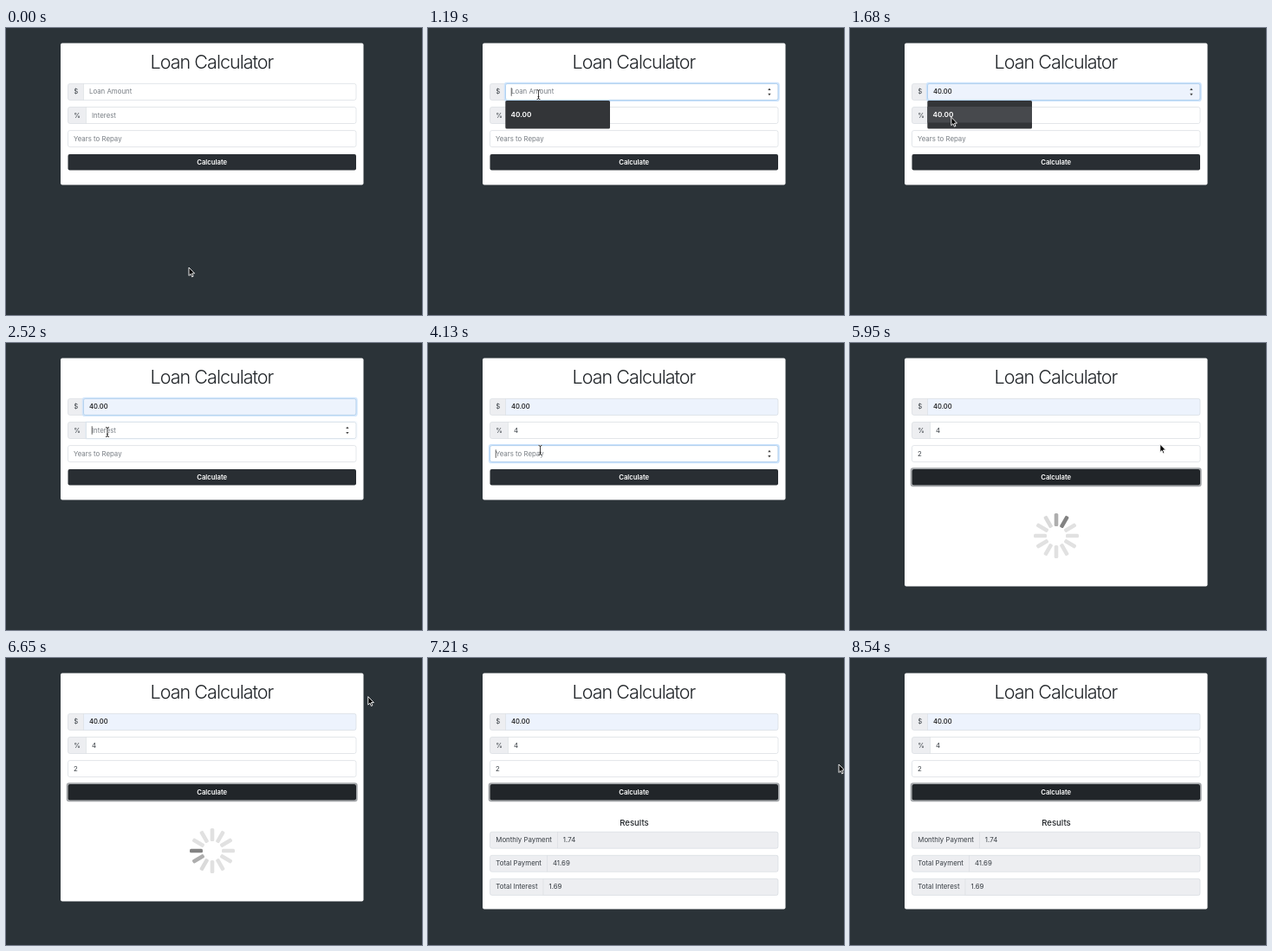
An HTML page that plays this animation: 480x332 px, repeating every 9.52 s.

```html
<!DOCTYPE html>
<html lang="en">
<head>
<meta charset="utf-8">
<title>Loan Calculator</title>
<style>
  html, body { margin: 0; width: 100%; height: 100%; overflow: hidden; background: #2b3338; }
  svg { display: block; width: 100vw; height: 100vh; }
  text { font: 400 7.85px Inter, "Liberation Sans", sans-serif; fill: #373d43; white-space: pre; }
  .title { font-size: 21.5px; font-weight: 300; letter-spacing: -.045em; fill: #212529; text-anchor: middle; }
  .head { font-size: 9.6px; font-weight: 500; fill: #212529; text-anchor: middle; }
  .hint { fill: #777d83; }
  .filled { font-size: 7.6px; font-weight: 500; fill: #111; }
  .button { font-size: 7.7px; font-weight: 600; fill: #fff; text-anchor: middle; }
  .option { font-size: 8.2px; font-weight: 600; fill: #fff; }
</style>
</head>
<body>
<svg id="stage" viewBox="0 0 480 332"></svg>
<script>
const LOOP = 9520, TICK = 70;
const GREY = '#edeef1', LINE = '#d3d8dd', DARK = '#292e33';
const LEFT = 71.5, RIGHT = 404, HIGH = 19, PITCH = 27.1, PAD = 6.5;
const OPEN = 1115, PICK = 2025, SUBMIT = 4955, DONE = 6930;
const stage = document.getElementById('stage');

function add(tag, attrs, parent = stage) {
  const el = document.createElementNS('http://www.w3.org/2000/svg', tag);
  for (const k in attrs) el.setAttribute(k, attrs[k]);
  parent.append(el);
  return el;
}
const group = parent => add('g', {}, parent);
const rect = (x, y, width, height, attrs, parent) =>
  add('rect', { x, y, width, height, ...attrs }, parent);
const outline = (x, y, w, h, stroke, width, parent) =>
  rect(x, y, w, h, { rx: 2.3, fill: 'none', stroke, 'stroke-width': width }, parent);
const shape = (d, attrs, parent) => add('path', { d, ...attrs }, parent);
function label(text, x, y, cls = '', parent) {
  const el = add('text', { x, y, class: cls }, parent);
  el.textContent = text;
  return el;
}
const show = (el, on) => el.setAttribute('visibility', on ? 'inherit' : 'hidden');

// Input group: grey lead part up to `split`, the rest filled with `fill`.
function row(y, split, fill, parent) {
  rect(LEFT, y, RIGHT - LEFT, HIGH, { rx: 2, fill: GREY }, parent);
  const body = rect(split, y, RIGHT - split, HIGH, { rx: 1, fill }, parent);
  if (split > LEFT) rect(split - .25, y, .5, HIGH, { fill: LINE }, parent);
  outline(LEFT, y, RIGHT - LEFT, HIGH, LINE, .6, parent);
  return body;
}

const card = rect(63, 17.6, 349.5, 164, { rx: 2, fill: '#fff' });
label('Loan Calculator', 237.5, 47, 'title');

// at: focus, set: value appears, out: blur
const fields = [
  { split: 89.5, sign: '$', hint: 'Loan Amount', value: '40.00', at: 1045, set: PICK, out: 2485 },
  { split: 92.5, sign: '%', hint: 'Interest', value: '4', at: 2485, set: 3215, out: 3740 },
  { split: LEFT, sign: '', hint: 'Years to Repay', value: '2', at: 3740, set: 4455, out: SUBMIT }
];
const amount = fields[0];
fields.forEach((f, i) => {
  const { split } = f, y = f.y = 64.4 + i * PITCH;
  const x = split + PAD, base = y + 12;
  f.body = row(y, split, '#fff');
  label(f.sign, 78.3, base);
  f.hintText = label(f.hint, x, base, 'hint');
  f.valueText = label(f.value, x, base, f === amount ? 'filled' : '');
  f.start = x;
  f.end = x + f.valueText.getComputedTextLength() + .5;
  f.ring = group();
  outline(split - .9, y - .9, RIGHT - split + 1.8, HIGH + 1.8, '#cce3fc', 1.6, f.ring);
  outline(split, y, RIGHT - split, HIGH, '#9fc9f0', .7, f.ring);
  f.spin = shape(`M392.2 ${y + 7.6}l1.7-2.4 1.7 2.4zm0 3.8l1.7 2.4 1.7-2.4z`, { fill: '#444' });
  f.caret = rect(x, y + 4.7, .7, 9.6, { fill: '#222' });
});

const glow = outline(70.6, 145.1, 334.2, 20.2, '#a2a5a8', 1.8);
const button = rect(LEFT, 146, RIGHT - LEFT, 18.4, { rx: 2, fill: DARK });
label('Calculate', 237.7, 158, 'button');

const loader = group();
const bars = Array.from({ length: 12 }, (_, i) =>
  rect(-2.3, -26, 4.6, 15, { rx: 1.6, transform: `translate(238 223) rotate(${i * 30})` }, loader));

// Annuity over 24 months at 4 % a year
const rate = .04 / 12, months = 24, loan = 40;
const monthly = loan * rate / (1 - (1 + rate) ** -months);
const results = group();
label('Results', 238, 194, 'head', results);
Object.entries({
  'Monthly Payment': monthly,
  'Total Payment': monthly * months,
  'Total Interest': monthly * months - loan
}).forEach(([name, sum], i) => {
  const y = 201.2 + i * PITCH;
  const text = label(name, 78.3, y + 12, '', results);
  const split = 78.3 + text.getComputedTextLength() + PAD;
  row(y, split, GREY, results);
  results.append(text);
  label(sum.toFixed(2), split + PAD, y + 12, '', results);
});

const popup = group();
rect(89.3, 84, 120.7, 32.5, { rx: 1.5, fill: '#333538' }, popup);
const lit = rect(89.3, 91, 120.7, 18.5, { fill: '#47494d' }, popup);
label('40.00', 95.5, 103.2, 'option', popup);

const pointer = group();
const cursors = {
  arrow: shape('M0 0V9.5L2.1 7.5 3.6 10.9 5.1 10.2 3.6 6.9H6.6Z',
    { fill: '#000', stroke: '#fff', 'stroke-width': .9 }, pointer),
  beam: group(pointer),
  hand: shape('M-1 1Q0-1.5 1 1V4.6Q2.3 4 3 5 6 5 6 7V9L5 12.5H-.5L-3.4 8.2Q-3 6-1 8Z',
    { fill: '#fff', stroke: '#000', 'stroke-width': .8 }, pointer)
};
for (const [stroke, w] of [['#fff', 1.6], ['#111', .8]])
  shape('M-2-5.6Q0-5.6 0-4 0-5.6 2-5.6M0-4V4M-2 5.6Q0 5.6 0 4 0 5.6 2 5.6M-1 2.4H1',
    { fill: 'none', stroke, 'stroke-width': w }, cursors.beam);

// Pointer moves: start, end, goal and, for curved ones, the bend.
const home = [211, 277];
const moves = [
  [0, 700, [127, 82], [10, -55]],
  [770, 910, [127.5, 77]],
  [1330, 2170, [117, 103], [108, 125]],
  [2660, 2870, [120.5, 104.5]],
  [3080, 3500, [129, 126]],
  [4060, 4130, [129.5, 124]],
  [4340, 4830, [235, 155]],
  [5180, 5950, [357.8, 117], [430, -50]],
  [5950, 7210, [474, 123], [400, -36]],
  [7910, 8540, [292, 345], [226, 123]]
];

const ease = u => { u = Math.min(1, Math.max(0, u)); return u * u * (3 - 2 * u); };

function pointerAt(t) {
  let at = home;
  for (const [start, end, goal, bend] of moves) {
    if (t < start) break;
    const u = ease((t - start) / (end - start)), v = 1 - u;
    at = at.map((a, k) => {
      const mid = bend ? bend[k] : (a + goal[k]) / 2;
      return v * v * a + 2 * u * v * mid + u * u * goal[k];
    });
  }
  return at;
}

function draw(t) {
  const [x, y] = pointerAt(t);
  const open = t >= OPEN && t < PICK;
  const overPopup = open && x > 89 && x < 210 && y > 84 && y < 116;
  const preview = overPopup && y > 91;
  let cursor = 'arrow';

  for (const f of fields) {
    const hover = !overPopup && x > f.split && x < RIGHT && y > f.y && y < f.y + HIGH;
    const focus = t >= f.at && t < f.out;
    const typed = t >= f.set;
    const filled = typed || (preview && f === amount);
    const blink = Math.floor((t - (typed ? f.set : f.at)) / 500) % 2 === 0;
    if (hover) cursor = 'beam';
    show(f.hintText, !filled);
    show(f.valueText, filled);
    show(f.spin, hover || focus);
    show(f.caret, focus && blink);
    f.caret.setAttribute('x', (typed ? f.end : f.start) - .2);
    f.ring.setAttribute('opacity', ease((t - f.at) / 140) * (1 - ease((t - f.out) / 140)));
    if (f === amount) f.body.setAttribute('fill', filled ? '#edf3fd' : '#fff');
  }
  if (x > LEFT && x < RIGHT && y > 146 && y < 165) cursor = 'hand';

  const sent = t >= SUBMIT, done = t >= DONE;
  card.setAttribute('height', done ? 273 : sent ? 264 : 164);
  button.setAttribute('fill', sent ? '#212529' : DARK);
  glow.setAttribute('opacity', ease((t - SUBMIT) / 140));
  show(loader, sent && !done);
  show(results, done);
  show(popup, open);
  show(lit, preview);

  // One turn a second, with a short fading tail
  const lead = Math.floor((t - 5950) * 12 / 1000) + 1;
  bars.forEach((bar, i) => {
    const age = ((lead - i) % 12 + 12) % 12;
    const tone = Math.min(225, 130 + 44 * age);
    bar.setAttribute('fill', `rgb(${tone},${tone},${tone})`);
  });

  for (const k in cursors) show(cursors[k], k === cursor);
  pointer.setAttribute('transform', `translate(${x.toFixed(2)} ${y.toFixed(2)})`);
}

const began = performance.now();
function tick() {
  const t = (performance.now() - began) % LOOP;
  draw(Math.floor(t / TICK) * TICK);
  requestAnimationFrame(tick);
}
tick();
</script>
</body>
</html>
```
